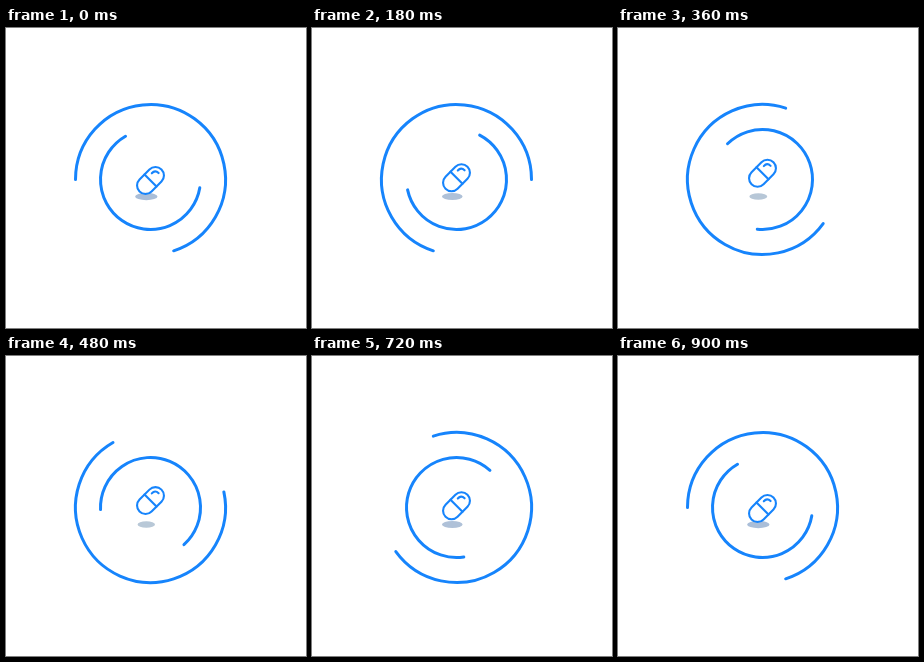
Recreate the animation shown at these times as an HTML page. Size 300 px wide and 300 px high, loop 0.93 s.

```html
<!DOCTYPE html>
<html lang="en">
<head>
<meta charset="utf-8">
<title>Pill loader</title>
<style>
  html, body { margin: 0; width: 100%; height: 100%; overflow: hidden; background: #fff; }
  svg { display: block; width: 100vw; height: 100vh; }
</style>
</head>
<body>
<svg viewBox="0 0 300 300" fill="none" stroke="#1684fc" stroke-linecap="round">
  <g stroke-width="3">
    <path id="outer"/>
    <path id="inner"/>
  </g>
  <ellipse id="shadow" cx="140.3" cy="168.5" stroke="none"/>
  <g id="pill" stroke-width="2.1">
    <g transform="rotate(-45)">
      <rect x="-15.5" y="-8.5" width="31" height="17" rx="8.5"/>
      <path d="M0-8.5V8.5"/>
    </g>
    <path d="M1.3-7.2Q4.6-11 8.1-7.4"/>
  </g>
</svg>
<script>
  const LOOP = 930, TURN = 900, STEP = 30;
  const CX = 144.5, CY = 151.5;
  const $ = id => document.getElementById(id);
  const outer = $('outer'), inner = $('inner'), shadow = $('shadow'), pill = $('pill');
  const mix = (a, b, k) => a + (b - a) * k;

  function point(r, deg) {
    const a = deg * Math.PI / 180;
    return (CX + r * Math.cos(a)).toFixed(3) + ' ' + (CY + r * Math.sin(a)).toFixed(3);
  }

  // Both sweeps are longer than half a circle.
  function arc(r, from, sweep) {
    return `M${point(r, from)}A${r} ${r} 0 1 1 ${point(r, from + sweep)}`;
  }

  function draw(ms) {
    const t = Math.floor((ms % LOOP + 0.5) / STEP) * STEP;
    const p = t / TURN;
    const lift = (1 - Math.cos(2 * Math.PI * p)) / 2;

    outer.setAttribute('d', arc(75, 180 - 360 * p, 252));
    inner.setAttribute('d', arc(50, 9.6 - 360 * p, 230.4));
    pill.setAttribute('transform', `translate(${CX} ${mix(152.5, 144.5, lift)})`);

    shadow.setAttribute('rx', mix(11.2, 8.7, lift));
    shadow.setAttribute('ry', mix(3.7, 3.2, lift));
    const rgb = [mix(170, 184, lift), mix(190, 200, lift), mix(216, 215, lift)];
    shadow.setAttribute('fill', `rgb(${rgb.map(Math.round)})`);
  }

  const start = performance.now();
  function tick() {
    draw(performance.now() - start);
    requestAnimationFrame(tick);
  }
  tick();
</script>
</body>
</html>
```
